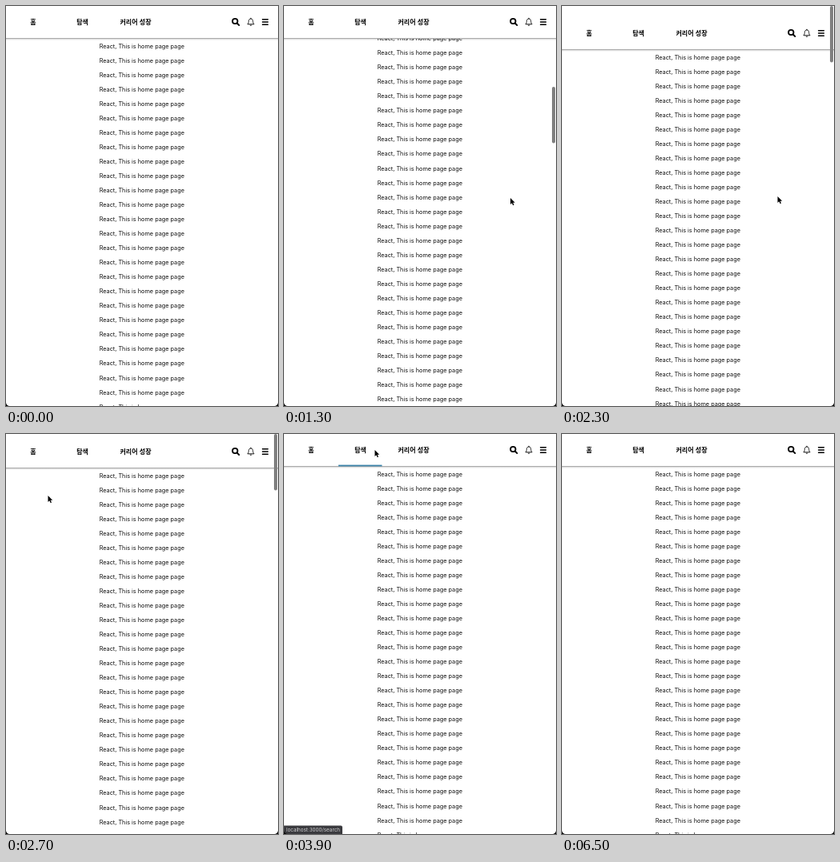
Animation of 340x500 px, one loop 7100 ms. Source, as an HTML page:

```html
<!DOCTYPE html>
<html lang="ko">
<head>
<meta charset="utf-8">
<style>
  html, body { margin: 0; height: 100%; overflow: hidden; background: #fff; }
  svg { display: block; width: 340px; height: 500px; }
  text { font-family: Inter, "Liberation Sans", sans-serif; white-space: pre; }
  #lines text { font-size: 7.3px; fill: #111; }
  #tabs text { font: bold 8px "Noto Sans CJK KR", "Noto Sans CJK", sans-serif; text-anchor: middle; }
  #status text { font-size: 6.3px; fill: #d4d4d6; }
</style>
</head>
<body>
<svg viewBox="0 0 340 500">
  <defs>
    <linearGradient id="shade" x2="0" y2="1">
      <stop stop-color="#000" stop-opacity=".16"/>
      <stop offset="1" stop-color="#000" stop-opacity="0"/>
    </linearGradient>
  </defs>
  <g id="lines"></g>
  <g id="header">
    <rect y="-20" width="340" height="60" fill="#fff"/>
    <rect y="40" width="340" height="1" fill="#aaa"/>
    <rect y="41" width="340" height="2" fill="url(#shade)"/>
    <g id="tabs"></g>
    <rect id="underline" y="38.6" height="1.8" fill="#3d85ab"/>
    <g fill="none" stroke="#000" stroke-linecap="round">
      <g stroke-width="1.8">
        <circle cx="286.3" cy="19" r="3.2"/>
        <path d="M288.8 21.5L291.3 24"/>
      </g>
      <path stroke-width=".9" stroke-linejoin="round"
        d="M306 15.2V15.9M302.2 22.5C303.4 21.2 303.2 20 303.4 18.6C303.8 15 308.2 15 308.6 18.6C308.8 20 308.6 21.2 309.8 22.5ZM305.1 24.1Q306 25 306.9 24.1"/>
      <path stroke-width="1.5" d="M320.6 16.7H327.4M320.6 20H327.4M320.6 23.3H327.4"/>
    </g>
  </g>
  <rect id="thumb" x="335" width="4" height="70.5" rx="2" fill="#7f7f7f"/>
  <g id="status">
    <path fill="#3a3a3e"/>
    <text x="3" y="496.8"></text>
  </g>
  <path d="M0 495.5V500H4.5A4.5 4.5 0 0 1 0 495.5ZM340 495.5V500H335.5A4.5 4.5 0 0 0 340 495.5Z"/>
  <path id="cursor" d="M0 0V8L1.9 6.3L3.2 9.2L4.5 8.6L3.2 5.8H5.7Z" stroke="#fff" stroke-width=".8" paint-order="stroke"/>
</svg>
<script>
const LOOP = 7100, STEP = 200, PITCH = 18.04;
const $ = id => document.getElementById(id);

const tabs = [
  { label: '홈', x: 34, left: 10, right: 58, url: 'localhost:3000' },
  { label: '탐색', x: 95.5, left: 68, right: 122.5, url: 'localhost:3000/search' },
  { label: '커리어 성장', x: 162, left: 122.5, right: 201.5, url: 'localhost:3000/career' }
];

// [time, scroll offset]; negative values are the overscroll bounce
const scrollKeys = [[0, 0], [100, 166], [300, 330], [500, 470], [700, 580], [900, 655], [1100, 698],
  [1300, 713], [1500, 800], [1700, 910], [1900, 967], [2300, -14], [2500, -6], [2700, -2], [2900, 0]];

// [time, x, y] of the pointer tip
const cursorKeys = [[100, 283, 240], [2100, 283, 240], [2300, 269.5, 238], [2700, 52.5, 77],
  [2900, 42, 35], [3100, 40, 21], [3300, 40, 21], [3900, 113.5, 20], [4100, 165, 21], [4300, 165, 21],
  [4500, 215, 32], [4900, 274, 94], [5100, 282, 107.5], [5900, 282, 107.5], [6300, 278, 107.5]];

function sample(keys, t) {
  const next = keys.findIndex(key => key[0] > t);
  if (next < 0) return keys.at(-1).slice(1);
  if (next === 0) return keys[0].slice(1);
  const a = keys[next - 1], b = keys[next];
  const k = (t - a[0]) / (b[0] - a[0]);
  return a.slice(1).map((v, i) => v + (b[i + 1] - v) * k);
}

const move = (el, x, y) => el.setAttribute('transform', `translate(${x} ${y})`);
const show = (el, on) => el.setAttribute('visibility', on ? 'visible' : 'hidden');

$('lines').innerHTML = Array.from({ length: 110 }, (_, i) =>
  `<text x="116.7" y="${52.6 + i * PITCH}">React, This is home page page</text>`).join('');
$('tabs').innerHTML = tabs.map(tab => `<text x="${tab.x}" y="22.9">${tab.label}</text>`).join('');

const [statusBox, statusText] = $('status').children;

function setHover(tab) {
  show($('underline'), tab);
  show($('status'), tab);
  if (!tab) return;
  $('underline').setAttribute('x', tab.left);
  $('underline').setAttribute('width', tab.right - tab.left);
  statusText.textContent = tab.url;
  const w = statusText.getComputedTextLength() + 6;
  statusBox.setAttribute('d', `M0 489.5H${w - 2}Q${w} 489.5 ${w} 491.5V500H0Z`);
}

function draw(now) {
  const time = now % LOOP;
  const t = time < 100 ? 0 : 100 + Math.floor((time - 100) / STEP) * STEP;

  const [scroll] = sample(scrollKeys, t);
  move($('lines'), 0, -scroll);
  move($('header'), 0, Math.max(0, -scroll));
  $('thumb').setAttribute('y', scroll > 0 ? 1 + scroll * 0.1403 : 0);
  show($('thumb'), t >= 100 && t < 3100);

  const [x, y] = sample(cursorKeys, t);
  const visible = t >= 100 && t < 6500;
  move($('cursor'), x, y);
  show($('cursor'), visible);
  setHover(visible && y < 40 && tabs.find(tab => x >= tab.left && x < tab.right));

  requestAnimationFrame(draw);
}
draw(performance.now());
</script>
</body>
</html>
```
